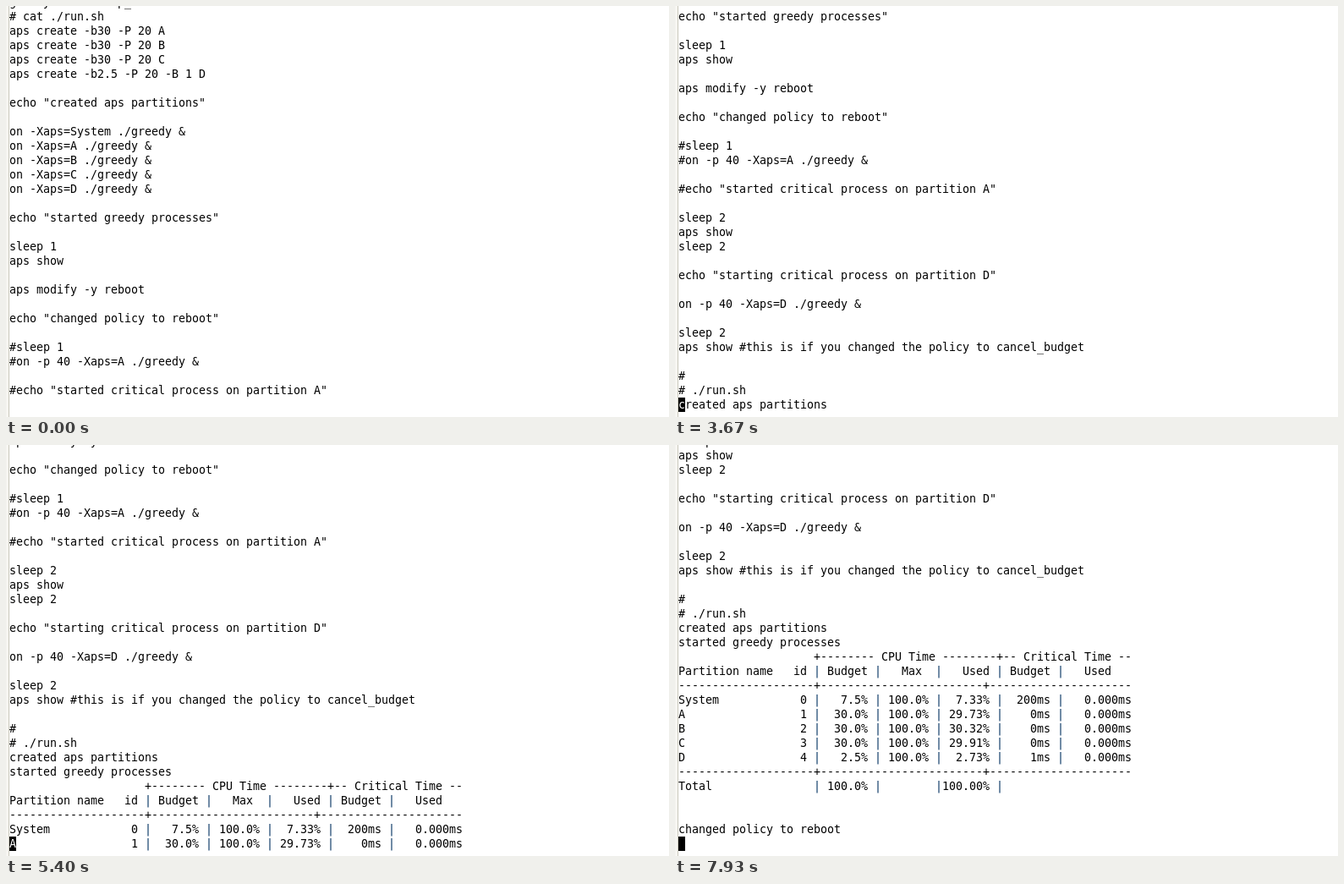
Write an HTML page with a canvas that moves like this. It is 784x486 px and loops after 8000 ms.

```html
<!DOCTYPE html>
<html lang="en">
<head>
<meta charset="utf-8">
<title>Terminal session</title>
<style>
  html, body { margin: 0; width: 100%; height: 100%; overflow: hidden; background: #fff; }
  canvas { display: block; }
</style>
</head>
<body>
<canvas id="screen" width="784" height="486"></canvas>
<script>
const LOOP = 8000, TICKS_PER_MS = 0.015;
const ROWS = 29, CELL = 8, LINE = 17, LEFT = 4, TOP = -13, BASELINE = 13;

const dash = n => "-".repeat(n);
const rule = `${dash(20)}+${dash(24)}+${dash(21)}`;
const row = (name, id, budget, used, critical) =>
  `${name.padEnd(18)}${id} | ${budget.padStart(6)} | 100.0% | ${used.padStart(6)} | ${critical.padStart(6)} |   0.000ms`;

const lines = `greedy  run.sh  p_
# cat ./run.sh
aps create -b30 -P 20 A
aps create -b30 -P 20 B
aps create -b30 -P 20 C
aps create -b2.5 -P 20 -B 1 D

echo "created aps partitions"

on -Xaps=System ./greedy &
on -Xaps=A ./greedy &
on -Xaps=B ./greedy &
on -Xaps=C ./greedy &
on -Xaps=D ./greedy &

echo "started greedy processes"

sleep 1
aps show

aps modify -y reboot

echo "changed policy to reboot"

#sleep 1
#on -p 40 -Xaps=A ./greedy &

#echo "started critical process on partition A"

sleep 2
aps show
sleep 2

echo "starting critical process on partition D"

on -p 40 -Xaps=D ./greedy &

sleep 2
aps show #this is if you changed the policy to cancel_budget

#
# ./run.sh
created aps partitions
started greedy processes
${" ".repeat(20)}+-------- CPU Time --------+-- Critical Time --
Partition name   id | Budget |   Max  |   Used | Budget |   Used
${rule}
${row("System", 0, "7.5%", "7.33%", "200ms")}
${row("A", 1, "30.0%", "29.73%", "0ms")}
${row("B", 2, "30.0%", "30.32%", "0ms")}
${row("C", 3, "30.0%", "29.91%", "0ms")}
${row("D", 4, "2.5%", "2.73%", "1ms")}
${rule}
${"Total".padEnd(20)}| 100.0% |        |100.00% |


changed policy to reboot
`.split("\n");

const COMMAND = lines.indexOf("# ./run.sh");
const HEADER = COMMAND + 3;
const PROMPT_TICK = 20, HEADER_TICK = 74;

// Grows from 0 to size between two ticks
const ramp = (tick, from, to, size) =>
  size * Math.min(1, Math.max(0, (tick - from) / (to - from)));

function state(tick) {
  const bottom = Math.round(28 + ramp(tick, 17, 19.6, 13) + ramp(tick, 54, 57, 3)
    + ramp(tick, 75, 81, 4) + ramp(tick, 81, 90, 9));
  let col = 0, length = lines[bottom].length;
  if (bottom === COMMAND) {
    // Three keys, then tab completion
    col = length = Math.round(2 + ramp(tick, 34, 38, 3) + ramp(tick, 41, 43, 6));
  } else if (bottom === HEADER) {
    col = ramp(tick, HEADER_TICK, HEADER_TICK + 1, 14);
    if (tick < HEADER_TICK) length = 0;
  }
  return { bottom, col, length };
}

// The cursor stays lit during output and blinks once the terminal is idle
function cursorOn(tick) {
  if (tick < PROMPT_TICK) return false;
  const key = t => Object.values(state(t)).join();
  let last = tick;
  while (last > PROMPT_TICK && key(last - 1) === key(tick)) last--;
  return Math.floor((tick - last + 1.4) / 7.15) % 2 === 0;
}

const ctx = document.getElementById("screen").getContext("2d", { alpha: false });

function rect(color, x, y, w, h) {
  ctx.fillStyle = color;
  ctx.fillRect(x, y, w, h);
}

function drawText(text, y, color) {
  [...text].forEach((ch, i) => {
    ctx.fillStyle = color || (ch === "|" ? "#003060" : "#000");
    ctx.fillText(ch, LEFT + i * CELL, y + BASELINE);
  });
}

function render(tick) {
  const { bottom, col, length } = state(tick);
  rect("#fff", 0, 0, 784, 486);
  rect("#f6f5f1", 0, 0, 3, 486);
  rect("#c9c8bc", 3, 0, 1, 486);
  ctx.font = '13.333px "DejaVu Sans Mono", monospace';

  const view = lines.slice(bottom - ROWS + 1, bottom);
  const last = lines[bottom].slice(0, length);
  view.forEach((text, i) => drawText(text, TOP + i * LINE));
  const y = TOP + (ROWS - 1) * LINE;
  drawText(last, y);

  if (cursorOn(tick)) {
    const x = LEFT + col * CELL;
    rect("#000", x, y, CELL, LINE);
    ctx.fillStyle = "#fff";
    ctx.fillText(last[col] || "", x, y + BASELINE);
  }
}

let shown;
function frame() {
  const tick = Math.floor((performance.now() % LOOP + 5) * TICKS_PER_MS);
  if (tick !== shown) render(shown = tick);
  requestAnimationFrame(frame);
}
frame();
</script>
</body>
</html>
```
